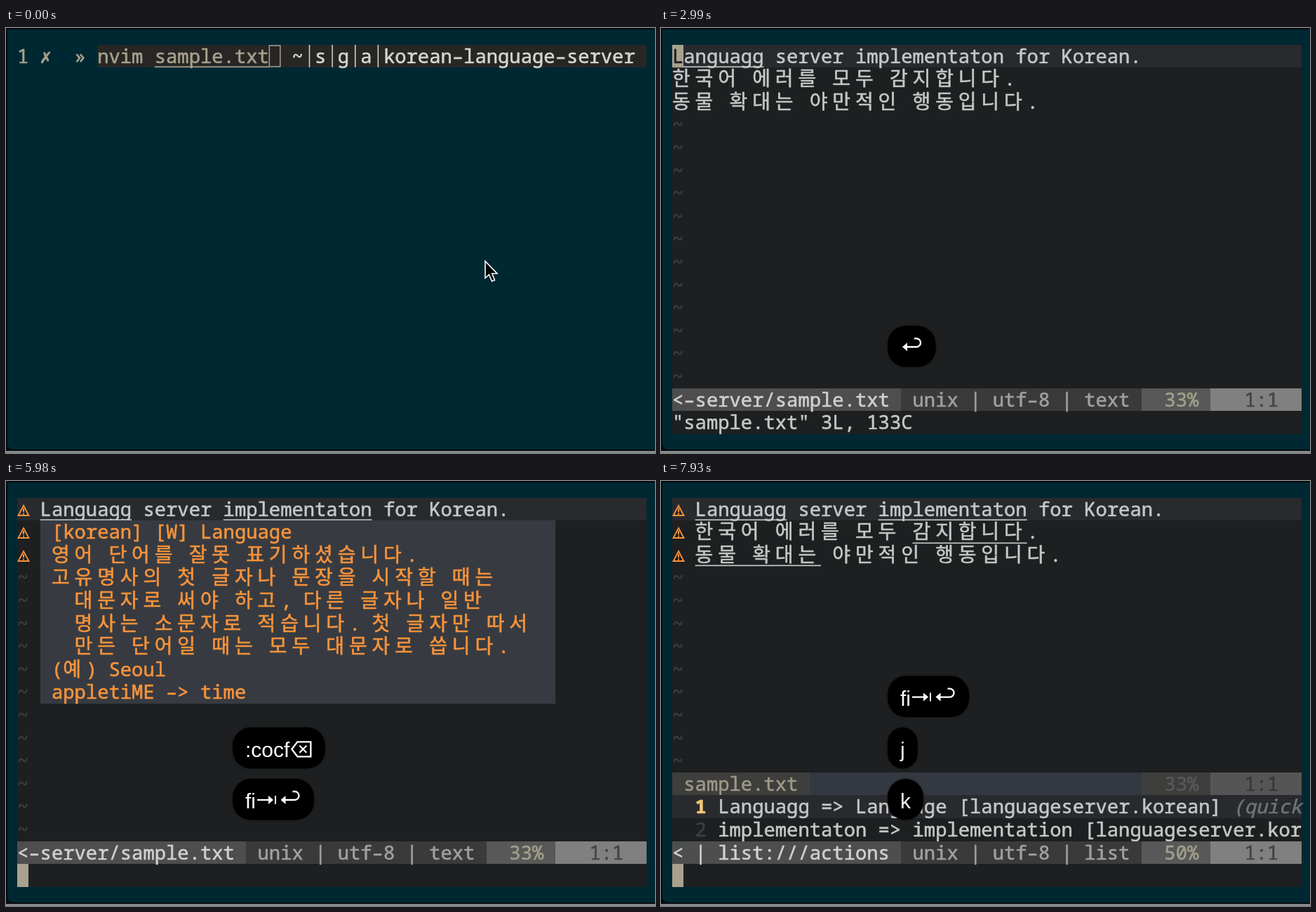
These frames come from a looping animation (925x605 px, 8000 ms). An HTML page with a canvas:

```html
<!DOCTYPE html>
<html lang="ko">
<head>
<meta charset="utf-8">
<title>Terminal</title>
<style>
html, body { margin: 0; width: 100%; height: 100%; overflow: hidden; background: #002833; }
canvas { display: block; width: 925px; height: 605px; }
</style>
</head>
<body>
<canvas id="stage" width="925" height="605"></canvas>
<script>
const ctx = document.getElementById('stage').getContext('2d');
const LOOP = 8000, X0 = 16, Y0 = 24, CW = 16.31, RH = 32.6, COLS = 55;
const MONO = '27.18px "Noto Sans Mono", "DejaVu Sans Mono", monospace';
const HANGUL = '28px "Noto Sans CJK KR", "Noto Sans CJK JP", "Noto Sans CJK", sans-serif';
const SANS = '30px "Liberation Sans", Arial, sans-serif';
const FG = '#c5c8c6', BEIGE = '#a8a18d', BG = '#1d1f21', LINE = '#282a2e',
      ORANGE = '#f9943b', DIM = '#3b3f44', WHITE = '#fff';

const cx = col => X0 + col * CW;
const ry = row => Math.floor(Y0 + row * RH);

function rect(x, y, w, h, color) {
  ctx.fillStyle = color;
  ctx.fillRect(x, y, w, h);
}

function cells(row, from, to, color) {
  const x = Math.round(cx(from));
  rect(x, ry(row), Math.round(cx(to)) - x, ry(row + 1) - ry(row), color);
}

// Places each character on the terminal grid; Hangul takes two cells.
// A hairline outline gives the terminal's medium weight.
function text(row, col, str, color = FG, style = '') {
  ctx.fillStyle = ctx.strokeStyle = color;
  ctx.lineWidth = .6;
  ctx.lineJoin = 'round';
  for (const ch of str) {
    if (col >= COLS) break;
    const wide = ch >= '가' && ch <= '힣';
    const glyph = ch === '-' ? '–' : ch;
    const x = cx(col), y = ry(row) + 26.3;
    ctx.font = style + (wide ? HANGUL : MONO);
    ctx.fillText(glyph, x, y);
    ctx.strokeText(glyph, x, y);
    col += wide ? 2 : 1;
  }
  ctx.lineJoin = 'miter';
}

function underline(row, from, to, color = FG) {
  rect(cx(from), Math.round(Y0 + row * RH) + 30.5, cx(to) - cx(from), 1.7, color);
}

function stroke(points, color, width, close) {
  ctx.beginPath();
  points.forEach(([x, y]) => ctx.lineTo(x, y));
  if (close) ctx.closePath();
  ctx.strokeStyle = color;
  ctx.lineWidth = width;
  ctx.stroke();
}

function fill(points, color) {
  ctx.beginPath();
  points.forEach(([x, y]) => ctx.lineTo(x, y));
  ctx.closePath();
  ctx.fillStyle = color;
  ctx.fill();
}

// Key icons, relative to the left edge of the icon and the top of its pill.
const ICON_W = 32.5;
const icons = {
  '↵'() {
    ctx.beginPath();
    ctx.moveTo(9, 30);
    ctx.lineTo(22, 30);
    ctx.arc(23, 24, 6, Math.PI / 2, -Math.PI / 2, true);
    ctx.lineTo(20, 18);
    ctx.strokeStyle = WHITE;
    ctx.lineWidth = 2.3;
    ctx.stroke();
    fill([[3, 30], [10, 24], [10, 36]], WHITE);
  },
  '⇥'() {
    stroke([[2, 30], [20, 30]], WHITE, 2.3);
    fill([[25, 30], [18, 24], [18, 36]], WHITE);
    stroke([[28, 24], [28, 36]], WHITE, 2);
  },
  '⌫'() {
    stroke([[3, 31], [11, 20.5], [30, 20.5], [30, 41.5], [11, 41.5]], WHITE, 2.3, true);
    stroke([[14, 26], [24, 36]], WHITE, 2.3);
    stroke([[24, 26], [14, 36]], WHITE, 2.3);
  }
};

function pill(keys, slot) {
  const y = 424 - slot * 73.2;
  const keyWidth = k => icons[k] ? ICON_W : ctx.measureText(k).width;
  ctx.font = SANS;
  const width = [...keys].reduce((sum, k) => sum + keyWidth(k), 36);
  ctx.save();
  ctx.shadowColor = 'rgba(0,0,0,.5)';
  ctx.shadowBlur = 3;
  ctx.fillStyle = '#000';
  ctx.beginPath();
  ctx.roundRect(323, y, width, 58.5, Math.min(26, width / 2));
  ctx.fill();
  ctx.restore();
  let x = 341;
  for (const k of keys) {
    if (icons[k]) {
      ctx.save();
      ctx.translate(x, y);
      icons[k]();
      ctx.restore();
    } else {
      ctx.fillStyle = WHITE;
      ctx.fillText(k, x, y + 42);
    }
    x += keyWidth(k);
  }
}

function frame() {
  rect(0, 0, 925, 605, '#050b0e');
  rect(0, 602, 925, 3, '#858a8c');
  ctx.fillStyle = '#002833';
  ctx.beginPath();
  ctx.roundRect(2, 2, 930, 598, [0, 0, 8, 8]);
  ctx.fill();
}

function pointer(x, y) {
  const shape = [[0, 0], [0, 24], [5.5, 19], [9.5, 28.5], [13.5, 26.8], [9.7, 17.5], [17, 17.5]]
    .map(([px, py]) => [x + px, y + py]);
  fill(shape, '#000');
  stroke(shape, WHITE, 1.6, true);
}

function shell(t) {
  cells(0, 7, COLS, '#272625');
  text(0, 0, '1 ✗  » nvim sample.txt', BEIGE);
  underline(0, 12, 22, BEIGE);
  text(0, 24, '~ s g a korean-language-server', '#d5d6d0');
  for (let col = 25; col < 32; col += 2) rect(cx(col) + 8, 24, 1.5, 32, '#d5d6d0');
  if (t >= FOCUS) cells(0, 22, 23, BEIGE);
  else {
    ctx.strokeStyle = BEIGE;
    ctx.lineWidth = 1.5;
    ctx.strokeRect(cx(22) + .5, 25, 15.5, 30);
  }
  if (t < ENTER) pointer(683, 332);
}

function status(row, name, mode, percent, pos) {
  cells(row, 0, 20, '#4e4e4e');
  cells(row, 20, 41, '#3a3a3a');
  cells(row, 41, 47, '#585858');
  cells(row, 47, COLS, '#808080');
  text(row, 0, name, '#d0d0d0');
  text(row, 21, 'unix | utf-8 | ' + mode, '#a0a0a0');
  text(row, 46 - percent.length, percent, '#a09f89');
  text(row, 50, pos, '#444');
}

function buffer(signs, lastTilde) {
  const col = signs ? 2 : 0;
  cells(0, 0, COLS, LINE);
  text(0, col, 'Languagg server implementaton for Korean.');
  text(1, col, '한국어 에러를 모두 감지합니다.');
  text(2, col, '동물 확대는 야만적인 행동입니다.');
  underline(0, col, col + 8);
  for (let row = 3; row <= lastTilde; row++) text(row, 0, '~', DIM);
  if (!signs) return;
  underline(0, 18, 31);
  underline(1, 21, 31);
  underline(2, 2, 13);
  for (let row = 0; row < 3; row++) {
    const y = ry(row);
    stroke([[25, y + 11], [32.5, y + 25], [17.5, y + 25]], ORANGE, 1.8, true);
    rect(24, y + 15, 2, 5, ORANGE);
    rect(24, y + 21.5, 2, 2, ORANGE);
  }
}

const hint = [
  '[korean] [W] Language',
  '영어 단어를 잘못 표기하셨습니다.',
  '고유명사의 첫 글자나 문장을 시작할 때는',
  '  대문자로 써야 하고, 다른 글자나 일반',
  '  명사는 소문자로 적습니다. 첫 글자만 따서',
  '  만든 단어일 때는 모두 대문자로 씁니다.',
  '(예) Seoul',
  'appletiME -> time'
];

function popup() {
  for (let row = 1; row < 9; row++) cells(row, 2, 47, '#373b41');
  hint.forEach((line, i) => text(i + 1, 3, line, ORANGE));
}

function actionList(selected) {
  cells(12, 0, 12, '#3e3e3c');
  cells(12, 12, 41, '#343840');
  cells(12, 41, 47, '#3e3e3c');
  cells(12, 47, COLS, '#555');
  text(12, 1, 'sample.txt', '#9d9987');
  text(12, 43, '33%', '#585858');
  text(12, 50, '1:1', '#393939');
  cells(13 + selected, 0, COLS, LINE);
  const items = ['Languagg => Language', 'implementaton => implementation'];
  items.forEach((item, i) => {
    const on = i === selected;
    text(13 + i, 2, String(i + 1), on ? '#f0c674' : DIM, on ? 'bold ' : '');
    text(13 + i, 4, item + ' [languageserver.korean]');
  });
  text(13, 49, '(quickfix)', '#707478', 'italic ');
  status(15, '< | list:///actions', 'list', selected ? '100%' : '50%', selected + 1 + ':1');
}

const FOCUS = 650, ENTER = 1170, OPEN = 1430, LOADED = 1950, SIGNS = 3250, HINT = 3380,
      COMMAND = 3510, LIST = 6240, DOWN = 7410, UP = 7670;

// Latest entry whose time has come.
const latest = (steps, t) => steps.reduce((now, [at, value]) => t >= at ? value : now, '');

const commandLine = [
  [3510, ':'], [3640, ':c'], [3770, ':co'], [3900, ':coc'], [4160, ':cocf'], [4680, ':coc'],
  [5070, ':cocf'], [5200, ':cocfi'], [5460, ':CocFix'], [5850, '']
];
const firstKeys = [
  [3510, ':'], [3640, ':c'], [3770, ':co'], [3900, ':coc'], [4160, ':cocf'], [4680, ':cocf⌫'], [6700, '']
];
const secondKeys = [[5070, 'f'], [5200, 'fi'], [5460, 'fi⇥'], [5850, 'fi⇥↵']];

function editor(t) {
  rect(16, 24, 897, 554, BG);
  const info = '"sample.txt" 3L, 133C';
  if (t < COMMAND) text(16, 0, info);
  if (t < LOADED) return cells(16, 21, 22, BEIGE);

  const listed = t >= LIST;
  buffer(t >= SIGNS, listed ? 11 : 14);
  if (listed) actionList(t >= DOWN && t < UP ? 1 : 0);
  else {
    if (t >= HINT) popup();
    status(15, '<-server/sample.txt', 'text', '33%', '1:1');
  }
  if (t < COMMAND) {
    const col = t >= SIGNS ? 2 : 0;
    cells(0, col, col + 1, BEIGE);
    text(0, col, 'L', BG);
  } else {
    const command = latest(commandLine, t);
    text(16, 0, command);
    cells(16, command.length, command.length + 1, BEIGE);
  }
}

function keys(t) {
  const shown = t >= ENTER && t < 3300 ? ['↵'] : [];
  shown.push(latest(firstKeys, t), latest(secondKeys, t));
  if (t >= DOWN) shown.push('j');
  if (t >= UP) shown.push('k');
  shown.filter(Boolean).reverse().forEach(pill);
}

function draw(now) {
  const t = now % LOOP;
  frame();
  if (t < OPEN) shell(t);
  else editor(t);
  keys(t);
  requestAnimationFrame(draw);
}
requestAnimationFrame(draw);
</script>
</body>
</html>
```
